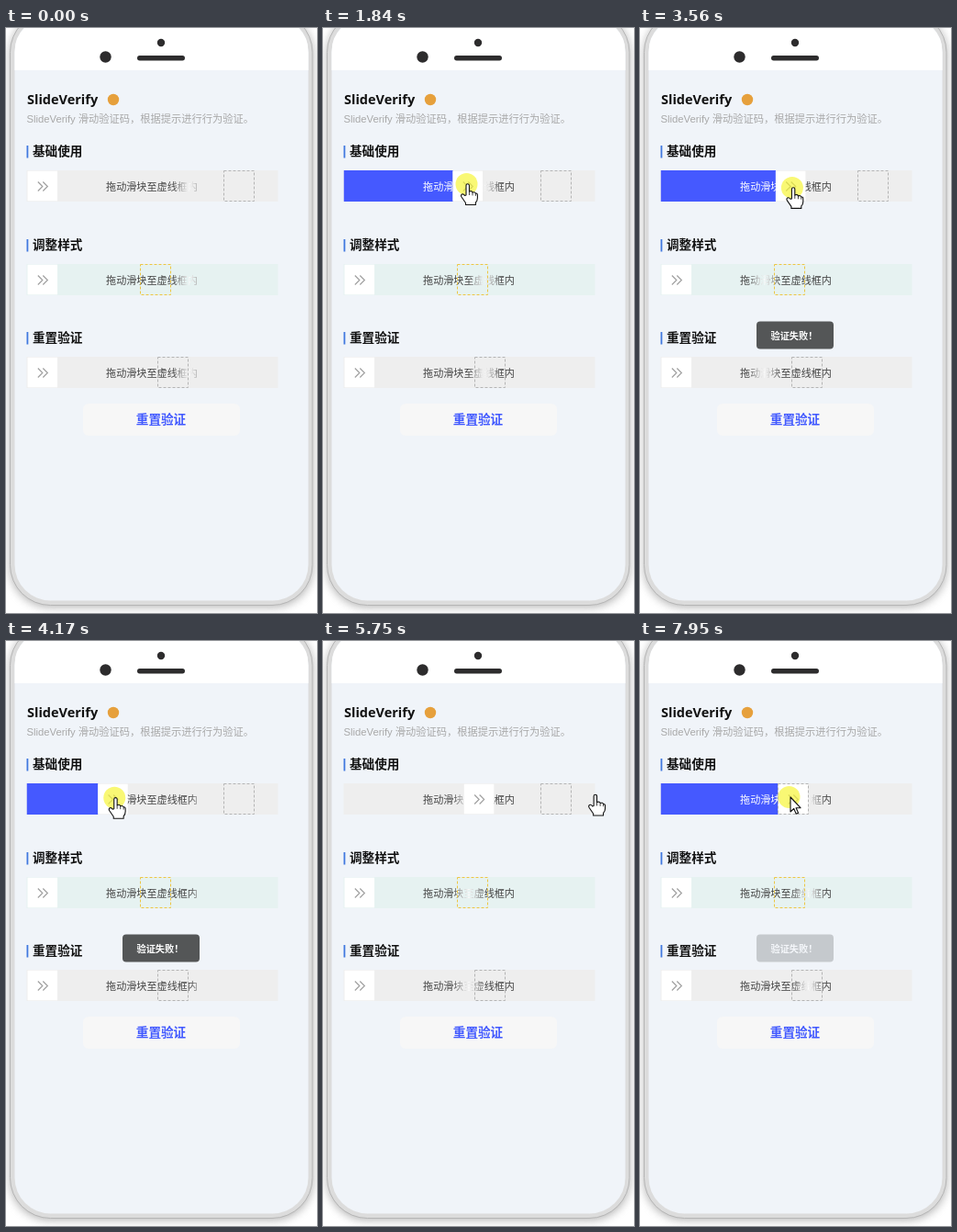
An HTML page that plays this animation: 339 px wide and 637 px high, repeating every 8 s.

```html
<!DOCTYPE html>
<html lang="zh-CN">
<head>
<meta charset="utf-8">
<title>SlideVerify</title>
<style>
html, body { margin: 0; width: 100%; height: 100%; overflow: hidden; background: #fff; }
svg { display: block; width: 339px; height: 637px; }
text { font-family: "Noto Sans CJK SC", "Noto Sans CJK", "Noto Sans CJK JP", sans-serif; }
.title { font: 600 14.5px "Noto Sans", "Open Sans", sans-serif; fill: #111; }
.intro { font: 11.25px "Liberation Sans", "Noto Sans CJK SC", "Noto Sans CJK", sans-serif; fill: #a8a8a8; }
.head { font-size: 13.6px; font-weight: 700; fill: #111; }
.hint { font-size: 11.1px; text-anchor: middle; }
.reset { font-size: 13.6px; font-weight: 700; text-anchor: middle; fill: #4159ff; }
.toast { font-size: 10.2px; font-weight: 700; fill: #fff; }
.goal { fill: none; stroke-width: 1; stroke-dasharray: 3 2; }
</style>
</head>
<body>
<svg viewBox="0 0 339 637">
  <defs>
    <linearGradient id="shine" gradientUnits="userSpaceOnUse" x1="-18" x2="18" y1="0" y2="0">
      <stop offset="0" stop-color="#444"/>
      <stop offset=".5" stop-color="#fff"/>
      <stop offset="1" stop-color="#444"/>
    </linearGradient>
    <filter id="blur" x="-10%" y="-10%" width="120%" height="120%">
      <feGaussianBlur stdDeviation="5"/>
    </filter>
    <clipPath id="filled"><rect id="clip" x="22.5" y="155" width="0" height="34"/></clipPath>
  </defs>

  <rect width="339" height="637" fill="#fff"/>
  <rect x="4" y="-16" width="331" height="647" rx="44" fill="#888" opacity=".6" filter="url(#blur)"/>
  <rect x="4.5" y="-17.5" width="329.5" height="646" rx="44" fill="#dcdcdc" stroke="#b5b5b5"/>
  <rect x="9.5" y="-13" width="320" height="636.5" rx="39" fill="#f0f4f9"/>
  <path d="M9.5 46V26Q9.5 10 20 0H319Q329.5 10 329.5 26V46Z" fill="#fff"/>
  <g fill="#2d2c2d">
    <circle cx="108.5" cy="31.5" r="6.2"/>
    <circle cx="169" cy="16" r="4.2"/>
    <rect x="143" y="30" width="52" height="5.4" rx="2.7"/>
  </g>

  <text class="title" x="23" y="83">SlideVerify</text>
  <circle cx="117" cy="78" r="6.2" fill="#e6a03c"/>
  <text class="intro" x="22.5" y="103">SlideVerify 滑动验证码，根据提示进行行为验证。</text>

  <g id="panels"></g>

  <rect x="84" y="409" width="171" height="35" rx="6" fill="#f7f7f7"/>
  <text class="reset" x="169" y="431">重置验证</text>

  <g id="toast">
    <rect x="127" y="319.5" width="84" height="30" rx="4" fill="#545657"/>
    <text class="toast" x="142.5" y="338.5">验证失败！</text>
  </g>

  <g id="cursor">
    <circle id="press" cx="-1.5" r="12" fill="#f6f432" opacity=".68"/>
    <g fill="#fff" stroke="#111" stroke-width="1.1" stroke-linejoin="round">
      <path id="arrow" d="M0 0V16L3.7 12.5L6.2 18.2L8.6 17.2L6.1 11.7H11Z"/>
      <g id="hand">
        <path d="M-2 12V1.5a1.7 1.7 0 0 1 3.4 0V8q3-1 3.6 1q3-.8 3.4 1.2q2-.4 2 1.6V15q0 3-2 5V22.5H-2.5V20.5L-7 14q-1.2-2 .5-3q1.6-.6 3 1.4Z"/>
        <path d="M1.4 8v4M5 9v3.4M8.4 10.4v2.4" fill="none" stroke-width=".8"/>
      </g>
    </g>
  </g>
</svg>
<script>
const LOOP = 8000;
const HOME = 23, BLOCK = 33, TRACK = 274;
const HINT = '拖动滑块至虚线框内';
const $ = id => document.getElementById(id);
const set = (id, attrs) => {
  for (const name in attrs) $(id).setAttribute(name, attrs[name]);
};
const show = (id, on) => set(id, { visibility: on ? 'visible' : 'hidden' });
const clamp = (v, max = 1) => Math.min(max, Math.max(0, v));
const smooth = u => u * u * (3 - 2 * u);

const panels = [
  { title: '基础使用', y: 155, bg: '#eee', goal: 237.5, line: '#b4b4b4' },
  { title: '调整样式', y: 257, bg: '#e6f2f1', goal: 146.5, line: '#edc643' },
  { title: '重置验证', y: 358, bg: '#eee', goal: 165.5, line: '#b4b4b4' },
];

const hint = (y, paint) => `<text class="hint" x="159" y="${y + 22}" ${paint}>${HINT}</text>`;
const bar = (y, paint) => `<rect x="22.5" y="${y}" width="${TRACK}" height="34" fill="${paint}"/>`;

const drawPanel = ({ title, y, bg, goal, line }, i) => `
  <rect x="22.5" y="${y - 27}" width="1.8" height="13.5" fill="#4179df"/>
  <text class="head" x="29" y="${y - 16}">${title}</text>
  ${bar(y, bg)}${hint(y, 'fill="url(#shine)"')}
  ${i ? '' : `<g clip-path="url(#filled)">${bar(y, '#4559ff')}${hint(y, 'fill="#fff"')}</g>`}
  <g id="block${i}">
    <rect x="23.5" y="${y + .7}" width="32.5" height="32.6" fill="#fff"/>
    <path d="M34.8 ${y + 12.5}l5 5l-5 5m5.5-10l5 5l-5 5" fill="none" stroke="#a0a0a0" stroke-width="1.2"/>
  </g>
  <rect id="goal${i}" class="goal" x="${goal}" y="${y + .5}" width="33" height="33" stroke="${line}"/>`;

$('panels').innerHTML = panels.map(drawPanel).join('');

const enter = { x: 297, y: 597, from: 70 };
const moves = [
  { from: 70, to: 820, x: 40, y: 170 },
  { from: 1230, to: 1760, x: 158, y: 170 },
  { from: 2530, to: 2990, x: 43, y: 173 },
  { from: 3210, to: 3660, x: 185, y: 174 },
  { from: 3750, to: 4640, x: 43, y: 167 },
  { from: 4740, to: 5140, x: 317, y: 167 },
  { from: 5650, to: 6250, x: 54, y: 173 },
  { from: 6500, to: 7290, x: 181, y: 172 },
  { from: 7290, to: 7500, x: 164, y: 170 },
];
// grab: pointer x at which the block starts to follow
const drags = [
  { down: 1230, up: 2200, grab: 40 },
  { down: 3210, up: 4640, grab: 43 },
  { down: 4740, up: 5610, grab: 106 },
  { down: 6500, up: 7290, grab: 54, solved: true },
];

const pointer = t => moves.reduce((p, m) => {
  const k = smooth(clamp((t - m.from) / (m.to - m.from)));
  return { x: p.x + (m.x - p.x) * k, y: p.y + (m.y - p.y) * k };
}, enter);

const pulled = (drag, t) => clamp(pointer(Math.min(t, drag.up)).x - drag.grab, TRACK - BLOCK);
const failed = drags.filter(d => !d.solved && pulled(d, d.up) > 0);

// The toast follows a failed drop, stays two seconds and fades.
const toastOpacity = t => Math.max(...failed.map(({ up }) =>
  clamp((t - up - 180) / 130) * clamp((up + 2400 - t) / 220)));

function render(t) {
  const { x, y } = pointer(t);
  const drag = drags.findLast(d => t >= d.down);
  const solved = drag?.solved && t >= drag.up;
  const pressed = drag && (t < drag.up || solved);
  const back = pressed ? 0 : smooth(clamp((t - drag?.up) / 335 || 0));
  const offset = drag ? pulled(drag, t) * (1 - back) : 0;
  const onBlock = !solved && Math.abs(x - HOME - offset - BLOCK / 2) < BLOCK / 2 && y < 190;
  const hand = onBlock || (drag && t < drag.up + 320);

  set('block0', { transform: `translate(${offset})` });
  set('clip', { width: pressed ? offset + (offset > 0) : 0 });
  set('goal0', { x: t < failed[1].up + 340 ? panels[0].goal : 150.5 });
  set('shine', { gradientTransform: `translate(${(200 + t * .1358) % TRACK})` });
  set('toast', { opacity: toastOpacity(t) });
  set('cursor', { transform: `translate(${x} ${y})`, display: t < enter.from ? 'none' : 'inline' });
  show('press', pressed);
  show('hand', hand);
  show('arrow', !hand);
}

const start = performance.now();
function frame() {
  render((performance.now() - start) % LOOP);
  requestAnimationFrame(frame);
}
frame();
</script>
</body>
</html>
```
